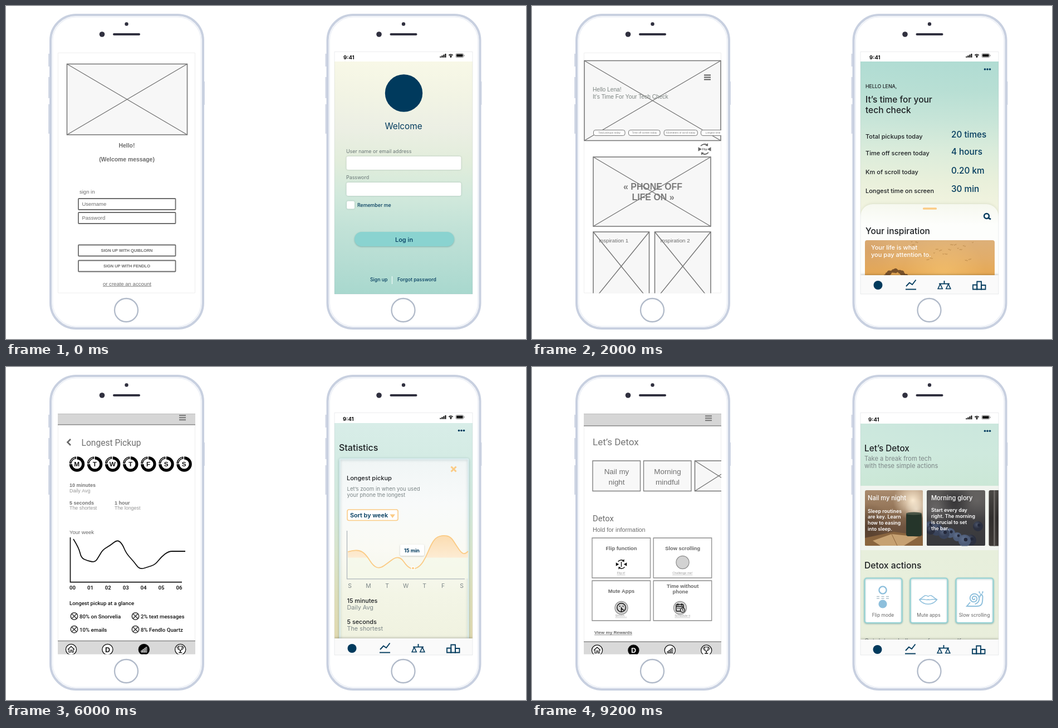
These frames come from a looping animation (934 by 600 pixels, 10000 ms). An HTML page with a canvas:

```html
<!DOCTYPE html>
<html lang="en">
<head>
<meta charset="utf-8">
<title>Wireframe and design</title>
<style>
html, body { margin: 0; width: 100%; height: 100%; overflow: hidden; background: #fff; }
canvas { display: block; }
</style>
</head>
<body>
<canvas id="stage" width="934" height="600"></canvas>
<script>
const c = document.getElementById('stage').getContext('2d');
const ARIAL = '"Liberation Sans", Arial, sans-serif';
const ROBOTO = 'Roboto, sans-serif';
const INTER = 'Inter, sans-serif';
const NAVY = '#003a5d', GREY = '#6c6c6c', ORANGE = '#fbcb85', INK = '#1c1f22', SOFT = '#7c8687', BLUE = '#8dbfdc';
const TAU = Math.PI * 2;

// ---- helpers ----
function text(str, x, y, size, color = GREY, font = ARIAL, weight = 400, align = 'left') {
  c.font = `${weight} ${size}px ${font}`;
  c.textAlign = align;
  c.fillStyle = color;
  c.fillText(str, x, y);
}
const mid = (str, x, y, size, color, font, weight) => text(str, x, y, size, color, font, weight, 'center');
const ui = (str, x, y, size, color = INK, weight = 400, align = 'left') => text(str, x, y, size, color, INTER, weight, align);
const title = (str, x, y, size) => ui(str, x, y, size, INK, 500);
function lines(list, x, y, step, draw) { list.forEach((s, i) => draw(s, x, y + i * step)); }
function linked(str, x, y, size, color, weight = 400) {
  mid(str, x, y, size, color, ARIAL, weight);
  const w = c.measureText(str).width;
  path([x - w / 2, y + 1.7, x + w / 2, y + 1.7], color, size / 11);
}
function paint(fill, stroke, width) {
  if (fill) { c.fillStyle = fill; c.fill(); }
  if (stroke) { c.strokeStyle = stroke; c.lineWidth = width; c.stroke(); }
}
function rect(x, y, x2, y2, fill, stroke, width = 1.6, r = 0) {
  c.beginPath();
  c.roundRect(x, y, x2 - x, y2 - y, r);
  paint(fill, stroke, width);
}
function disc(x, y, r, fill, stroke, width = 1.5) {
  c.beginPath();
  c.arc(x, y, r, 0, TAU);
  paint(fill, stroke, width);
}
function path(p, stroke, width = 1.6, fill, closed) {
  c.beginPath();
  for (let i = 0; i < p.length; i += 2) c.lineTo(p[i], p[i + 1]);
  if (closed) c.closePath();
  paint(fill, stroke, width);
}
function curve(p) {
  const n = p.length;
  c.moveTo(p[0], p[1]);
  for (let i = 2; i < n - 2; i += 2) {
    const last = i === n - 4;
    c.quadraticCurveTo(p[i], p[i + 1],
      last ? p[i + 2] : (p[i] + p[i + 2]) / 2, last ? p[i + 3] : (p[i + 1] + p[i + 3]) / 2);
  }
}
function shadow(color, blur, dy, draw) {
  c.save();
  c.shadowColor = color; c.shadowBlur = blur; c.shadowOffsetY = dy;
  draw();
  c.restore();
}
function clip(x, y, w, h, draw, r = 0) {
  c.save();
  c.beginPath();
  c.roundRect(x, y, w, h, r);
  c.clip();
  draw();
  c.restore();
}
function fade(y, y2, ...stops) {
  const g = c.createLinearGradient(0, y, 0, y2);
  stops.forEach((s, i) => g.addColorStop(i / (stops.length - 1), s));
  return g;
}
function glow(x, y, r, rgb, a) {
  const g = c.createRadialGradient(x, y, 0, x, y, r);
  g.addColorStop(0, `rgba(${rgb},${a})`);
  g.addColorStop(1, `rgba(${rgb},0)`);
  disc(x, y, r, g);
}
function crossBox(x, y, x2, y2) {
  rect(x, y, x2, y2, '#f7f7f7', '#737373', 1.5);
  path([x, y, x2, y2], '#737373', 1.4);
  path([x, y2, x2, y], '#737373', 1.4);
}

// ---- phone ----
function phone(dx) {
  c.save();
  c.translate(dx, 0);
  const side = '#d3d9e6';
  [[86, 109], [128, 166], [177, 230]].forEach(([a, b]) => rect(76, a, 79, b, side));
  rect(354, 136, 357, 178, side);
  rect(80, 16, 354, 581, '#fff', '#c8d0e0', 4, 46);
  rect(83.5, 19.5, 350.5, 577.5, null, '#eef1f7', 2, 43);
  disc(216.5, 32.5, 3.2, '#30303f');
  disc(172.5, 51, 4.8, '#30303f');
  rect(192, 49, 241, 53, '#30303f', null, 0, 2);
  disc(216, 548, 21, '#fff', '#b1bac9', 2.3);
  c.restore();
}

// ---- wireframe parts ----
function burger(x, y, color = '#6a6a6a') {
  for (let i = 0; i < 3; i++) rect(x, y + i * 4 - 1, x + 12, y + i * 4 + 1, color);
}
function header(bottom, y, x = 311) {
  rect(93, 84, 340, bottom, '#d6d6d6');
  path([93, bottom, 340, bottom], '#8a8a8a', 1.3);
  path([93, 84.5, 340, 84.5], '#bdbdbd', 1);
  burger(x, y, '#757575');
}
function arrowArc(r, from, color) {
  const to = from + 1.4;
  c.beginPath();
  c.arc(0, 0, r, from, to);
  paint(null, color, 1.8);
  const x = r * Math.cos(to), y = r * Math.sin(to), s = Math.sign(x);
  path([x + s * 1.6, y - s * 3.2, x - s * 3.2, y + s * 1.6, x + s * 1.6, y + s * 2.4], null, 0, color, true);
}
function flipIcon(x, y, k, color) {
  c.save();
  c.translate(x, y);
  c.scale(k, k);
  arrowArc(9, -2.45, color);
  arrowArc(9, .69, color);
  path([-11.5, -3.7, -5, 0, -11.5, 3.7], null, 0, color, true);
  path([11.5, -3.7, 5, 0, 11.5, 3.7], null, 0, color, true);
  c.restore();
}
function segment(x, y, R, r, a, b, fill, stroke, width) {
  c.beginPath();
  c.arc(x, y, R, a, b);
  c.arc(x, y, r, b, a, true);
  c.closePath();
  paint(fill, stroke, width);
}
function tabIcon(x, y, on, draw) {
  disc(x, y, 9.6, on ? '#000' : '#fff', '#111', 1.3);
  draw(x, y, on ? '#fff' : '#111');
}
function tabs(top, active) {
  rect(93, top, 340, 520, '#d9d9d9');
  path([93, top, 340, top], '#8a8a8a', 1.3);
  const icons = [
    (x, y, k) => {
      path([x - 6, y, x, y - 5.5, x + 6, y], k, 1.3);
      path([x - 4, y - 1, x - 4, y + 5, x - 1, y + 5, x - 1, y + 1, x + 1.5, y + 1, x + 1.5, y + 5, x + 4, y + 5, x + 4, y - 1], k, 1.2);
    },
    (x, y, k) => mid('D', x, y + 4.5, 12.5, k, ARIAL, 700),
    (x, y, k) => { for (let i = 0; i < 4; i++) rect(x - 5 + i * 2.7, y + 2 - i * 2, x - 3 + i * 2.7, y + 5, null, k, .9); },
    (x, y, k) => {
      path([x - 3.5, y - 6, x + 3.5, y - 6, x + 2.5, y, x, y + 2, x - 2.5, y], k, 1.2, null, true);
      path([x - 3.5, y - 4.5, x - 6, y - 4.5, x - 5, y - 1, x - 2.5, y], k, 1);
      path([x + 3.5, y - 4.5, x + 6, y - 4.5, x + 5, y - 1, x + 2.5, y], k, 1);
      path([x, y + 2, x, y + 5], k, 1.5);
      path([x - 3, y + 5.5, x + 3, y + 5.5], k, 1.5);
    }
  ];
  icons.forEach((draw, i) => tabIcon(117 + i * 65.4, top + 15.5, i === active, draw));
}

// ---- app parts ----
function status(top, x, y) {
  rect(590, 82, 838, top, '#fff');
  ui('9:41', x, y, 9.6, '#111', 700);
  const b = y - 4;
  for (let i = 0; i < 4; i++) rect(779.3 + i * 3, b - 1.2 - i * 1.6, 781.5 + i * 3, b + .8, '#111');
  [2.5, 5].forEach(r => {
    c.beginPath();
    c.arc(799, b + .2, r, -2.4, -.74);
    paint(null, '#111', 1.6);
  });
  disc(799, b - .1, 1.2, '#111');
  rect(807.8, b - 6.3, 821.7, b + .7, '#fff', '#777', .8, 2);
  rect(809, b - 5.2, 820.6, b - .4, '#111', null, 0, 1);
  rect(822.5, b - 4, 823.5, b - 1.6, '#777');
}
function dots(y) { for (let i = 0; i < 3; i++) disc(813.5 + i * 4.5, y, 1.8, NAVY); }
function nav(top, dx = 0) {
  shadow('rgba(0,0,0,.25)', 4, -1, () => rect(590, top, 838, 524, '#fafafa'));
  c.save();
  c.translate(dx, top);
  disc(621.5, 18, 8, NAVY);
  path([672, 20, 678, 13.5, 683, 17, 689.5, 8.5], NAVY, 1.9);
  path([671, 25.5, 690, 25.5], NAVY, 1.9);
  path([740.5, 10, 740.5, 15], NAVY, 1.9);
  path([731, 15.5, 750, 15.5], NAVY, 1.8);
  [733.2, 747.8].forEach(x => path([x, 16, x - 4, 24.5, x + 4, 24.5], NAVY, 1.6, null, true));
  rect(792, 17.5, 799.3, 25.5, null, NAVY, 1.8);
  rect(799.3, 11.5, 807, 25.5, null, NAVY, 1.8);
  rect(807, 18, 814.5, 25.5, null, NAVY, 1.8);
  c.restore();
}

// ---- scenes: [wireframe, design] ----
function wireLogin() {
  crossBox(109.5, 104.5, 325.5, 232);
  mid('Hello!', 217, 255, 10.4, GREY, ARIAL, 700);
  mid('(Welcome message)', 217, 279.5, 10.4, GREY, ARIAL, 700);
  text('sign in', 132, 338, 9.5);
  [347, 372, 430.5, 458.5].forEach(y => rect(130, y, 304.5, y + 20, '#fff', GREY, 1.8, 1));
  text('Username', 136.5, 360, 9.5);
  text('Password', 136.5, 385, 9.5);
  mid('SIGN UP WITH QUIBLORN', 217, 443, 7.4, GREY, ARIAL, 700);
  mid('SIGN UP WITH FENDLO', 217, 471, 7.4, GREY, ARIAL, 700);
  linked('or create an account', 217.5, 503.5, 9.55, GREY);
}
function appLogin() {
  rect(590, 100, 838, 519, fade(100, 519, '#f8f8e7', '#f2f4e4', '#ecefe4', '#e2eddb', '#d2e9dc', '#c2e2d7', '#b6ddd3', '#a8d8ce'));
  status(100, 606, 96);
  disc(714.5, 157, 33.7, NAVY);
  ui('Welcome', 714, 222, 15.3, NAVY, 400, 'center');
  ui('User name or email address', 611, 264.5, 8.9, '#6a7776');
  ui('Password', 611, 311.5, 8.9, '#6a7776');
  shadow('rgba(60,90,85,.35)', 3, 0, () => {
    rect(611.5, 271, 817.5, 295, '#fff', null, 0, 3);
    rect(611.5, 318, 817.5, 342, '#fff', null, 0, 3);
    rect(612, 351.5, 626, 365.5, '#fff', null, 0, 2.5);
  });
  ui('Remember me', 631, 362, 8.75, NAVY, 500);
  shadow('rgba(40,100,100,.4)', 3, 1, () => rect(626, 407, 805, 433, '#8ad3d0', null, 0, 13));
  ui('Log in', 715, 424.5, 11, NAVY, 500, 'center');
  ui('Sign up', 654, 496, 8.7, NAVY, 500);
  path([693.5, 487, 693.5, 501], '#eefaf7', 1.2);
  ui('Forgot password', 703, 496, 8.7, NAVY, 500);
}
function wireHome() {
  crossBox(94, 98.5, 339, 242.5);
  burger(309, 124.5, '#5c5c5c');
  text('Hello Lena!', 109, 154, 10.2, '#7c8481');
  text('It’s Time For Your Tech Check', 109, 167, 10.2, '#7c8481');
  ['Total pickups today', 'Time off screen today', 'Kilometers of scroll today', 'Longest time'].forEach((s, i) => {
    const x = 110.5 + i * 63 + (i > 1 ? .7 : 0) + (i > 2 ? 3.3 : 0);
    rect(x, 223.5, x + (i === 2 ? 60 : 56.5), 233.5, '#fff', '#777', 1, 3.5);
    mid(s, x + 28.5 + (i === 2 ? 1.5 : 0) - (i > 2 ? 7 : 0), 230.2, 4.7, '#8a8a8a');
  });
  flipIcon(310, 258, 1, '#666');
  mid('Flip', 310, 260, 5, '#666', ARIAL, 700);
  crossBox(110, 272, 321, 397);
  mid('« PHONE OFF', 217, 330.5, 15.9, '#7b7b7b', ARIAL, 700);
  mid('LIFE ON »', 217.5, 349.5, 15.9, '#7b7b7b', ARIAL, 700);
  [110, 220.5].forEach((x, i) => {
    crossBox(x, 407, x + 100.5, 531);
    text('Inspiration ' + (i + 1), x + 10, 425.5, 9.75);
  });
}
function sunset() {
  rect(598, 422, 831, 490, fade(422, 488, '#ddb079', '#e2ad69', '#e7a850'));
  glow(740, 486, 75, '252,205,120', .5);
  glow(606, 440, 50, '200,140,85', .3);
  for (let i = 0; i < 38; i++) {
    const u = (i * .618) % 1, v = (i * .381 + .2 * Math.sin(i * 3)) % 1;
    const x = 682 + u * 112, y = 425 + Math.abs(v) * 36;
    path([x - 1.3, y - .6, x, y + .4, x + 1.4, y - .9], '#a9773c', .7);
  }
  for (let i = 0; i < 11; i++) disc(634 + i * 3.8, 486 - 9 * Math.sin(i / 10 * Math.PI), 2.2 + i % 3, '#78512a');
  ui('Your life is what', 609, 438.5, 11, '#fff', 500);
  ui('you pay attention to.', 609, 451.5, 11, '#fff', 500);
}
function appHome() {
  rect(590, 100, 838, 519, fade(100, 370, '#b0dcd3', '#b8dfd4', '#c8e5d8', '#dbecdb', '#e9f0db', '#f3f4e0'));
  status(100, 606, 96);
  dots(114);
  title('HELLO LENA,', 599, 148, 8.8);
  title('It’s time for your', 599, 174, 15.5);
  title('tech check', 599, 192.5, 15.5);
  [['Total pickups today', '20 times', 238.5, 237], ['Time off screen today', '4 hours', 269, 267.5],
   ['Km of scroll today', '0.20 km', 303, 301.5], ['Longest time on screen', '30 min', 337, 335]].forEach(([a, b, y, v]) => {
    title(a, 599, y, 11);
    ui(b, 753, v, 15.3, NAVY, 500);
  });
  shadow('rgba(90,110,80,.15)', 5, -1, () => rect(590, 357, 838, 540, fade(357, 395, '#f6f8ef', '#fdfefc'), null, 0, 22));
  rect(702, 363.3, 727, 366.8, ORANGE, null, 0, 1.5);
  disc(816.5, 378.5, 4.4, null, NAVY, 2.5);
  path([819, 381.5, 824, 384.3], NAVY, 2.7);
  title('Your inspiration', 599, 411, 15.5);
  clip(598, 422, 233, 80, sunset, 4);
  nav(485);
}
function wireStats() {
  header(111, 93.3, 309.5);
  segment(136, 157.5, 32, 18.5, 0, Math.PI * 1.5, '#000');
  segment(138.5, 155, 28, 20.3, -Math.PI / 2 + .08, -.08, '#fff', '#000', 4);
  text('Congrats Lena!', 184, 141, 17.4, '#666');
  text('You can check you stats here', 184, 160, 9.2, '#666');
  const tile = (x, y, label, value) => {
    crossBox(x, y, x + 102, y + 96);
    lines(label, x + 51, y + 18, 12, (s, a, b) => mid(s, a, b, 11.6, '#777', INTER));
    mid(value, x + 51, y + 86.5, 19.6, '#6b6b6b', INTER);
  };
  tile(104, 230.5, ['Last Pickup'], '20h38');
  tile(104, 336.5, ['Best Detox'], '1h38');
  tile(104, 442, ['Checking', 'every'], '5 min');
  tile(221, 249.5, ['Pickups'], '40 times');
  tile(221, 355.5, ['Longest scroll'], '40 Km');
  tile(221, 461, ['Longest', 'Pickup'], '30 min');
}
// Big figures with small units, set from the right edge.
function figure(parts, right, y) {
  [...parts].reverse().forEach(s => {
    ui(s, right, y, /\d/.test(s) ? 15 : 11.4, NAVY, 500, 'right');
    right -= c.measureText(s).width;
  });
}
function appStats() {
  rect(590, 100, 838, 519, fade(100, 490, '#d0eae3', '#d0eae0', '#cfe8d9', '#d2e4cb', '#dadfb9', '#e2d9ac'));
  status(100.5, 605, 96.5);
  dots(114);
  title('Statistics', 597.5, 151, 16);
  ui('All your statistics summary', 598, 167.5, 11.3, SOFT);
  [['Longest', 'pickup', '1', 'h ', '20', 'min'], ['Longest', 'scroll', '20', 'Km'], ['Total', 'pickups', '40', ' times'],
   ['Total', 'scroll', '345', 'Km'], ['Checking', 'every', '5', ' min'], ['Total', 'offscreen', '1', 'h ', '38', 'min']].forEach(([a, b, ...v], i) => {
    const x = 600 + (i % 2) * 124, y = 196 + (i >> 1) * 106.7;
    shadow('rgba(70,110,120,.4)', 3, 2, () => rect(x, y, x + 106, y + 86, '#fff', '#d8eef3', 2.4, 2));
    lines([a, b], x + 8, y + 18.5, 12.7, (s, p, q) => title(s, p, q, 10.6));
    figure(v, x + 98, y + 78);
  });
  nav(488);
}
function wirePickup() {
  header(104, 87.2);
  path([116, 130, 110.5, 135.5, 116, 141], '#666', 2.6);
  text('Longest Pickup', 135.5, 142, 15.6, '#707070', ROBOTO);
  [...'MTWTFSS'].forEach((s, i) => {
    const x = 127.5 + i * 32.1, y = 175;
    segment(x, y, 13.7, 8.6, -Math.PI / 2, Math.PI, '#000');
    segment(x - 1, y - .8, 12, 9.6, Math.PI + .1, Math.PI * 1.5 - .12, '#fff', '#000', 1.5);
    mid(s, x - .3, y + 4.2, 11.8, '#111', ARIAL, 700);
  });
  [['10 minutes', 'Daily Avg', 114, 216], ['5 seconds', 'The shortest', 114, 247.5], ['1 hour', 'The longest', 195, 247.5]].forEach(([a, b, x, y]) => {
    text(a, x, y, 9, '#757575', ARIAL, 700);
    text(b, x, y + 9.5, 8.9, '#969696');
  });
  text('Your week', 114, 300.5, 9.5, '#666');
  path([115.5, 307, 115.5, 387.7, 316, 387.7], '#111', 1.7);
  c.beginPath();
  curve([121, 310, 131, 326, 135, 344, 146, 349, 160, 352, 167, 341, 174, 329, 188, 321, 200, 311, 209, 319, 216, 336, 230, 351, 240, 365, 256, 360, 268, 356, 279, 342, 292, 332, 305, 332, 322, 332]);
  paint(null, '#111', 1.8);
  for (let i = 0; i < 7; i++) mid('0' + i, 119.5 + i * 31.9, 400.5, 9.6, '#222', ROBOTO, 700);
  text('Longest pickup at a glance', 114, 429, 9.7, '#111', ROBOTO, 500);
  ['80% on Snorvelia', '2% text messages', '10% emails', '8% Fendlo Quartz'].forEach((s, i) => {
    const x = 122.5 + (i % 2) * 110, y = 449 + (i >> 1) * 23.7;
    disc(x, y, 6.3, '#eee', '#222', 1.3);
    path([x - 4.4, y - 4.4, x + 4.4, y + 4.4], '#222', 1.2);
    path([x - 4.4, y + 4.4, x + 4.4, y - 4.4], '#222', 1.2);
    text(s, x + 9.5, y + 4, 9.7, '#111', ROBOTO, 500);
  });
  tabs(493.5, 2);
}
function appPickup() {
  rect(590, 100, 838, 519, fade(100, 490, '#d8ede8', '#d3ebe3', '#d3e9dc', '#dae6cc', '#dfdfba', '#e2dab0'));
  status(101, 605, 97);
  dots(114.5);
  title('Statistics', 598, 151, 16);
  shadow('rgba(70,110,120,.35)', 4, 1, () => rect(599.5, 165.5, 830.5, 510, fade(165, 490, '#f0f5f5', '#f8fafa', '#fafaf4', '#f3f5e6', '#f0f2e0'), '#dceff1', 2, 2));
  path([799.5, 179.5, 808.5, 188.5], ORANGE, 3);
  path([799.5, 188.5, 808.5, 179.5], ORANGE, 3);
  title('Longest pickup', 612, 203.5, 11);
  ui('Let’s zoom in when you used', 612.5, 223, 9.6, SOFT);
  ui('your phone the longest', 612.5, 234, 9.6, SOFT);
  rect(613, 257, 704, 276.5, '#fff', ORANGE, 1.6, 3);
  ui('Sort by week', 618, 271, 10.8, NAVY, 600);
  path([689.5, 265.5, 699, 265.5, 694.2, 272], null, 0, ORANGE, true);
  const wave = [614, 333, 623, 330, 638, 331, 648, 340, 660, 359, 672, 363, 686, 353, 699, 343, 710, 344, 720, 359, 731, 365, 744, 359, 754, 343, 763, 321, 772, 307, 786, 303, 799, 306, 809, 322, 818, 335, 825, 337, 830, 332];
  const area = () => {
    c.beginPath();
    curve(wave);
    c.lineTo(830, 381);
    c.lineTo(614, 381);
    c.closePath();
  };
  area();
  paint('rgba(246,249,234,.8)');
  clip(613, 295, 217, 48.5, () => { area(); paint(fade(303, 344, '#fbdcb0', '#fdecd4')); });
  path([612.5, 295, 612.5, 381.8, 824, 381.8], '#aeb6ba', 1.3);
  c.beginPath();
  curve(wave);
  paint(null, ORANGE, 1.8);
  disc(731, 362.5, 2.7, ORANGE, '#fff', 1.4);
  shadow('rgba(0,0,0,.2)', 3, 1, () => rect(708, 320, 751, 340, '#fff', null, 0, 2));
  ui('15 min', 729, 333.5, 9, NAVY, 700, 'center');
  [...'SMTWTFS'].forEach((s, i) => ui(s, 617.5 + i * 33.5, 397.5, 10.4, SOFT, 400, 'center'));
  [['15 minutes', 'Daily Avg', 424.5], ['5 seconds', 'The shortest', 462.5]].forEach(([a, b, y]) => {
    title(a, 612.5, y, 10.8);
    ui(b, 612.5, y + 12.8, 10.8, SOFT);
  });
  nav(489);
}
function wireDetox() {
  header(106, 88.3);
  text('Let’s Detox', 109, 141, 17, '#757575', ROBOTO);
  rect(109, 169, 194.5, 223.5, '#f8f8f8', '#808080', 1.4);
  rect(200.5, 169, 286, 223.5, '#f8f8f8', '#808080', 1.4);
  crossBox(292.5, 169, 378, 223.5);
  lines(['Nail my', 'night'], 152, 192.5, 19, (s, x, y) => mid(s, x, y, 13.4, '#707070'));
  lines(['Morning', 'mindful'], 243.5, 192.5, 19, (s, x, y) => mid(s, x, y, 13.4, '#707070'));
  text('Detox', 109, 278, 14.8, '#6c6c6c', ROBOTO);
  text('Hold for information', 109, 297, 10.85, '#6c6c6c');
  [['Flip function', 'Flip it!'], ['Slow scrolling', 'Challenge me!'], ['Mute Apps', 'Shhhh...'], ['Time without', 'Schedule it']].forEach(([a, b], i) => {
    const x = 108 + (i % 2) * 110.2, y = 308 + (i >> 1) * 77;
    rect(x, y, x + 104.5, y + 72, '#fff', '#8c8c8c', 1.3);
    mid(a, x + 52.5, y + (i === 3 ? 13 : 22), 9.3, '#666', ARIAL, 700);
    linked(b, x + 52, y + 65, 5.6, '#999');
  });
  mid('phone', 266.5, 408, 9.3, '#666', ARIAL, 700);
  flipIcon(160.5, 355.5, .85, '#111');
  path([160.5, 351, 160.5, 360], '#111', 1.4);
  [[270.5, 352], [160.5, 434], [266, 434]].forEach(([x, y]) => disc(x, y, 11.6, '#d2d2d2', '#8c8c8c', 1.2));
  disc(160.5, 433.5, 7.7, null, '#111', 1.4);
  disc(157.5, 431, 1, '#111');
  disc(163.5, 431, 1, '#111');
  path([160.5, 441, 160.5, 434, 162.5, 437, 165, 438], '#111', 1.5);
  rect(259, 428, 272, 440, null, '#111', 1.4, 1);
  path([259, 431.5, 272, 431.5], '#111', 1.5);
  [262, 269].forEach(x => path([x, 426, x, 430], '#111', 1.4));
  [261.5, 264.5].forEach(x => rect(x, 434, x + 1.5, 435.5, '#111'));
  disc(270.5, 438, 4, '#d2d2d2', '#111', 1.3);
  path([270.5, 435.8, 270.5, 438.2, 272.3, 438.2], '#111', 1);
  linked('View my Rewards', 146, 481, 8.05, '#666', 700);
  tabs(495, 1);
}
function nightPhoto() {
  rect(598, 222, 702, 322, fade(222, 322, '#a88a6e', '#947558', '#6f5440', '#6a4c33'));
  glow(684, 240, 36, '255,238,212', .95);
  glow(690, 256, 20, '255,246,228', .6);
  glow(604, 290, 45, '62,44,32', .5);
  path([598, 308, 650, 297, 702, 304, 702, 322, 598, 322], null, 0, '#8a653f', true);
  path([612, 313, 646, 301, 694, 306, 668, 322, 626, 322], null, 0, '#c6a172', true);
  path([646, 301, 656, 322], '#8d653d', 1);
  rect(672, 263, 700, 305, '#25352a', null, 0, 4);
  c.beginPath();
  c.ellipse(686, 264, 14, 2.5, 0, 0, TAU);
  paint('#4a5546');
}
function berryPhoto() {
  rect(709, 222, 814, 322, fade(222, 322, '#5a5856', '#403f41', '#37383c'));
  glow(724, 255, 32, '140,138,136', .45);
  glow(800, 240, 40, '125,122,120', .45);
  glow(760, 240, 30, '28,28,32', .5);
  for (let i = 0; i < 9; i++) {
    const x = 714 + (i * 37) % 98, y = 286 + (i * 13) % 32, r = 8 + i % 4;
    disc(x, y, r, ['#39435a', '#4d5c78', '#2b3040'][i % 3]);
    glow(x - 2, y - 3, r * .8, '125,142,172', .4);
    disc(x + 2, y - 2, r * .3, '#23283a');
  }
}
function snail(x, y) {
  c.beginPath();
  for (let a = 0; a < 14; a += .2) c.lineTo(x - 1 + (1 + a * .66) * Math.cos(a), y - 1 + (1 + a * .66) * Math.sin(a));
  paint(null, BLUE, 1.9);
  c.beginPath();
  c.moveTo(x - 8, y + 6);
  c.lineTo(x - 14, y + 13);
  c.lineTo(x + 4, y + 13);
  c.bezierCurveTo(x + 15, y + 13, x + 14, y + 5, x + 14.5, y - 3);
  c.bezierCurveTo(x + 15, y - 9, x + 9, y - 9, x + 9.5, y - 3);
  paint(null, BLUE, 1.9);
  [8.5, 14.5].forEach(d => { path([x + 12, y - 7, x + d, y - 12], BLUE, 1.3); disc(x + d, y - 12.5, 1.3, BLUE); });
}
function lips(x, y) {
  c.beginPath();
  c.moveTo(x - 16, y);
  c.bezierCurveTo(x - 9, y - 3, x - 6, y - 11, x, y - 5.5);
  c.bezierCurveTo(x + 6, y - 11, x + 9, y - 3, x + 16, y);
  c.bezierCurveTo(x + 8, y + 11, x - 8, y + 11, x - 16, y);
  c.moveTo(x - 15, y);
  c.bezierCurveTo(x - 5, y - 2, x - 4, y + 2, x, y);
  c.bezierCurveTo(x + 4, y + 2, x + 5, y - 2, x + 15, y);
  paint(null, BLUE, 1.4);
}
function appDetox() {
  rect(590, 100, 838, 214, fade(100, 214, '#cbe7dd', '#cee9dd', '#cbe7d6'));
  rect(590, 214, 838, 330, '#f1f4ef');
  rect(590, 330, 838, 519, fade(330, 490, '#e7efdc', '#e9eedb'));
  status(102, 604, 97.5);
  dots(115.3);
  title('Let’s Detox', 597, 151.5, 15.3);
  ui('Take a break from tech', 597, 168.5, 11.1, SOFT);
  ui('with these simple actions', 597, 181.5, 11.1, SOFT);
  clip(598, 222, 104.5, 100.5, nightPhoto, 3);
  clip(709, 222, 105, 100.5, berryPhoto, 3);
  rect(820.5, 222, 850, 322.5, fade(222, 322, '#4b4845', '#302d2c', '#3e3936'), null, 0, 3);
  rect(829, 222, 832, 322.5, '#6a6663');
  ui('Nail my night', 603, 239.5, 11.1, '#fff', 500);
  ui('Morning glory', 717, 240, 11.1, '#fff', 500);
  const body = (s, x, y) => ui(s, x, y, 8.8, '#fff', 600);
  lines(['Sleep routines', 'are key. Learn', 'how to easing', 'into sleep.'], 603, 262.5, 10.9, body);
  lines(['Start every day', 'right. The morning', 'is crucial to set', 'the bar.'], 717, 261, 10.9, body);
  title('Detox actions', 597, 362.5, 15.7);
  ['Flip mode', 'Mute apps', 'Slow scrolling'].forEach((s, i) => {
    const x = 597.5 + i * 82;
    shadow('rgba(60,120,125,.4)', 3, 1, () => rect(x, 380.5, x + 67, 461, '#fff', '#95d3d5', 2.2, 4));
    ui(s, x + 33, 449.5, 8.5, '#666', 400, 'center');
  });
  disc(630, 402, 6.6, '#fff', BLUE, 2.4);
  [413.5, 417].forEach(y => { for (let i = 0; i < 3; i++) path([619 + i * 8.5, y, 624 + i * 8.5, y], '#a5b9c4', 1.3); });
  disc(630, 427, 7.6, BLUE);
  lips(711.5, 419);
  snail(795, 418);
  ui('Get detox challenges for yourself', 597, 498, 11.1, SOFT);
  nav(491, -1);
}

const scenes = [[wireLogin, appLogin], [wireHome, appHome], [wireStats, appStats], [wirePickup, appPickup], [wireDetox, appDetox]];
const HOLD = 2000;
let shown = -1;

function draw(i) {
  c.fillStyle = '#fff';
  c.fillRect(0, 0, 934, 600);
  phone(0);
  phone(497.5);
  rect(93.5, 84.5, 339.5, 517, '#fff', '#eeeeee', 1);
  clip(93, 84, 247, 433.5, scenes[i][0]);
  clip(590, 82, 248, 437, scenes[i][1]);
  rect(590, 82.5, 838, 519, null, 'rgba(120,130,140,.14)', 1);
}
function tick() {
  const i = Math.floor(performance.now() / HOLD) % scenes.length;
  if (i !== shown) draw(shown = i);
  requestAnimationFrame(tick);
}
tick();
</script>
</body>
</html>
```
